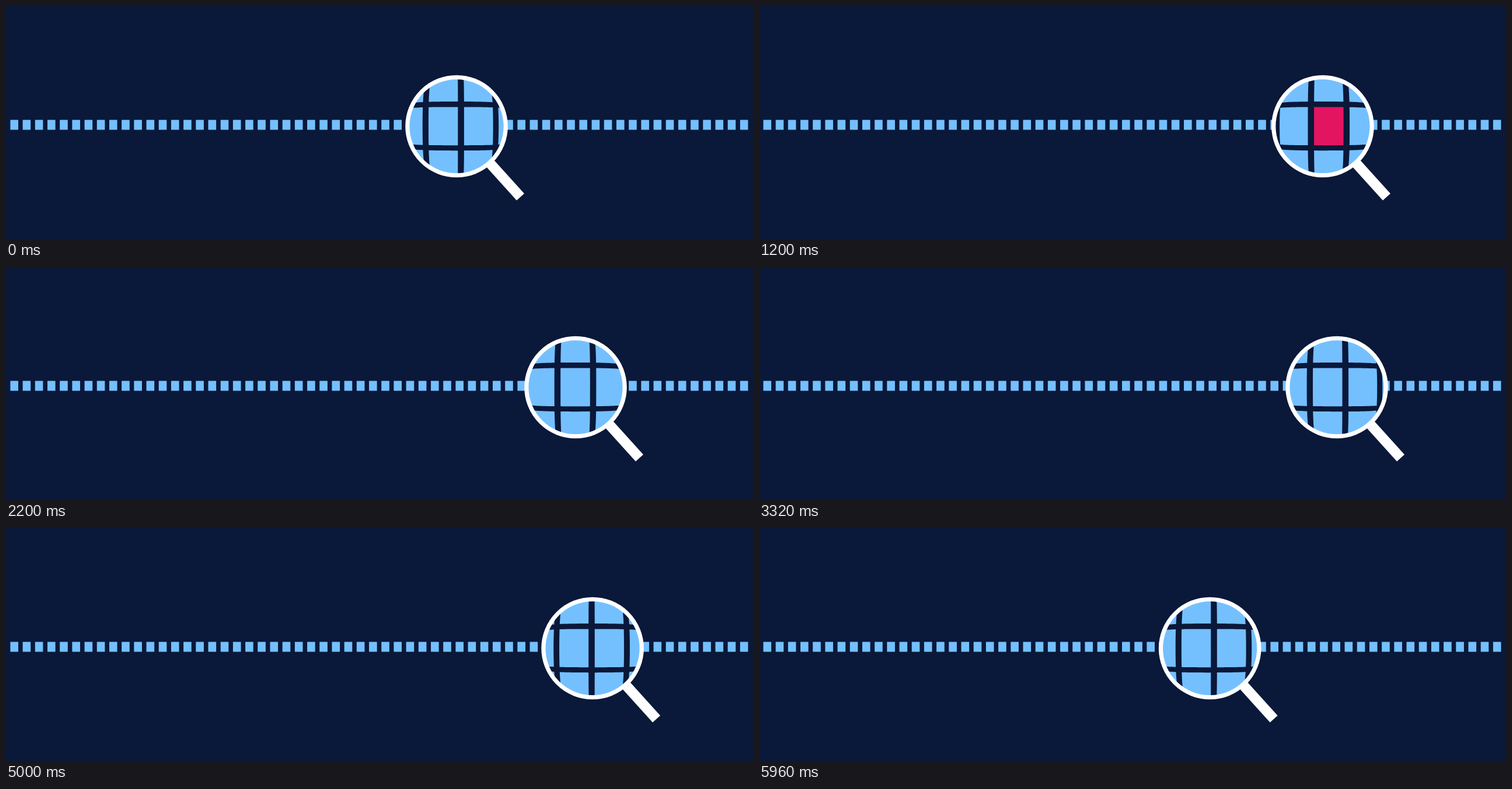
Write an HTML page with a canvas that moves like this. It is 1280 px wide and 400 px high and loops after 6000 ms.

```html
<!DOCTYPE html>
<html lang="en">
<head>
<meta charset="utf-8">
<title>Magnifier</title>
<style>
html, body { margin: 0; width: 100%; height: 100%; overflow: hidden; background: #0a1839; }
canvas { display: block; }
</style>
</head>
<body>
<canvas id="stage" width="1280" height="400"></canvas>
<script>
const ctx = document.getElementById("stage").getContext("2d");
const NAVY = "#0a1839", BLUE = "#74c0ff", RED = "#e31561", WHITE = "#ffffff";
const LOOP = 6000, STEP = 40;
const LENS_Y = 206.5, HOME_X = 771.7, FOUND_X = 976, AWAY_X = 1410;
const GRID_X = 779, GRID_PITCH = 56.15, GRID_GAP = 9.7, MARKED = 3;
const ROWS = [[-100, -39.1], [-30.4, 30], [38.3, 100]];

// Cubic Bezier easing with flat ends: control points (x1, 0) and (x2, 1).
function ease(p, x1 = 0.42, x2 = 0.58) {
  if (p <= 0) return 0;
  if (p >= 1) return 1;
  let lo = 0, hi = 1;
  for (let i = 0; i < 24; i++) {
    const s = (lo + hi) / 2, r = 1 - s;
    if (3 * x1 * s * r * r + 3 * x2 * s * s * r + s * s * s < p) lo = s;
    else hi = s;
  }
  return lo * lo * (3 - 2 * lo);
}

const mix = (a, b, p) => a + (b - a) * p;

function lensX(t) {
  if (t < 100) t += LOOP;
  if (t < 3120) return mix(HOME_X, FOUND_X, ease((t - 120) / 1280));
  if (t < 3960) return FOUND_X + 300 * ((t - 3120) / 640) ** 2.63;
  return mix(AWAY_X, HOME_X, ease((t - 3960) / 2100, 0.56, 0.287));
}

function lensScale(t) {
  return 1 + 0.16 * ease(1 - Math.abs(t - 1790) / 390);
}

// The marked cell is red when found, then blinks and stays blue.
function isRed(t) {
  if (t < 2200) return true;
  return t < 2840 && Math.floor((t - 2200) / 160) % 2 === 1;
}

// Bulge: magnifies the middle of the lens, less towards its rim.
function bulge(x, y) {
  const r = Math.min(Math.hypot(x, y), 105);
  const m = 1.09 - 0.06 * (r / 82) ** 4;
  return [x * m, y * m];
}

function fillBulged(left, top, right, bottom) {
  const corners = [[left, top], [right, top], [right, bottom], [left, bottom]];
  const n = 14;
  ctx.beginPath();
  corners.forEach(([x, y], i) => {
    const [nx, ny] = corners[(i + 1) % 4];
    for (let k = 0; k < n; k++) ctx.lineTo(...bulge(mix(x, nx, k / n), mix(y, ny, k / n)));
  });
  ctx.fill();
}

function drawStrip() {
  ctx.fillStyle = BLUE;
  for (let i = 0; i < 60; i++) ctx.fillRect(7.4 + i * 21.195, 195.5, 13.6, 17);
}

function drawGrid(cx, t) {
  const first = Math.floor((cx - 105 - GRID_X) / GRID_PITCH);
  for (let col = first; col < first + 5; col++) {
    const left = GRID_X + col * GRID_PITCH + GRID_GAP / 2 - cx;
    ROWS.forEach(([top, bottom], row) => {
      ctx.fillStyle = col === MARKED && row === 1 && isRed(t) ? RED : BLUE;
      fillBulged(left, top, left + GRID_PITCH - GRID_GAP, bottom);
    });
  }
}

function drawLens(t) {
  const cx = lensX(t), scale = lensScale(t);
  if (cx > 1370) return;
  ctx.save();
  ctx.translate(cx, LENS_Y);

  ctx.save();
  ctx.beginPath();
  ctx.arc(0, 0, 83 * scale, 0, 2 * Math.PI);
  ctx.fillStyle = NAVY;
  ctx.fill();
  ctx.clip();
  drawGrid(cx, t);
  ctx.restore();

  ctx.scale(scale, scale);
  ctx.strokeStyle = ctx.fillStyle = WHITE;
  ctx.lineWidth = 7.2;
  ctx.beginPath();
  ctx.arc(0, 0, 84.2, 0, 2 * Math.PI);
  ctx.stroke();
  ctx.rotate(Math.atan2(121.5, 109.5));
  ctx.fillRect(84, -8.75, 79.5, 17.5);
  ctx.restore();
}

function frame() {
  const t = Math.floor((performance.now() % LOOP) / STEP) * STEP;
  ctx.fillStyle = NAVY;
  ctx.fillRect(0, 0, 1280, 400);
  drawStrip();
  drawLens(t);
  requestAnimationFrame(frame);
}
frame();
</script>
</body>
</html>
```
